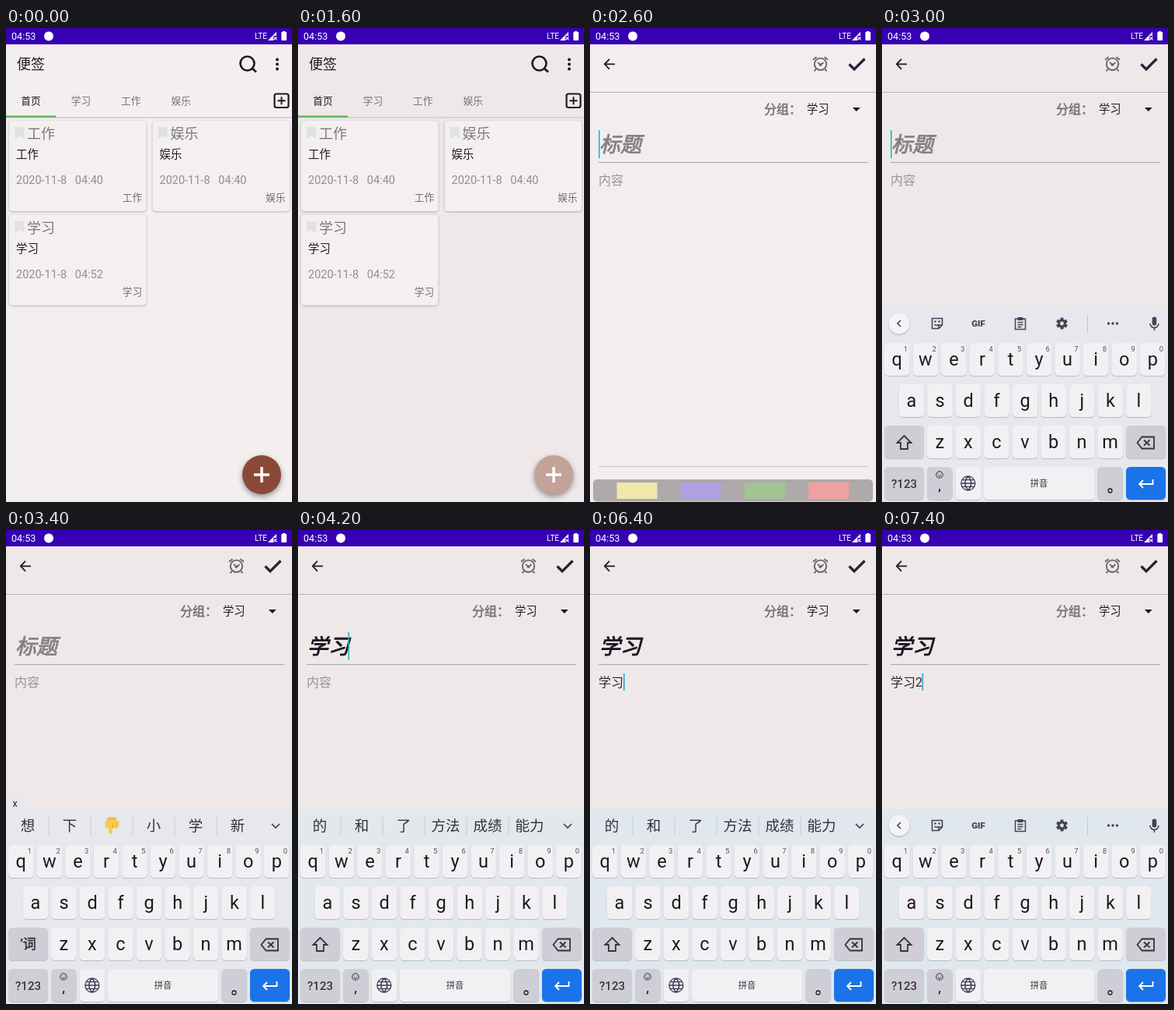
An HTML page with a canvas that plays this animation: 368x608 px, repeating every 8000 ms.

```html
<!DOCTYPE html>
<html lang="zh-CN">
<head>
<meta charset="utf-8">
<title>便签</title>
<style>
html, body { margin: 0; width: 100%; height: 100%; overflow: hidden; background: #efe8e8; }
canvas { display: block; width: 368px; height: 608px; }
</style>
</head>
<body>
<canvas id="stage" width="368" height="608"></canvas>
<script>
const ctx = document.getElementById('stage').getContext('2d');
const LOOP = 8000;
const FONT = 'Roboto, "Noto Sans CJK SC", "Noto Sans CJK", sans-serif';
const INK = '#1d1a1f';

function text(str, x, midY, size, color = INK, align = 'left', style = '') {
  ctx.font = `${style} ${size}px ${FONT}`;
  ctx.fillStyle = color;
  ctx.textAlign = align;
  ctx.fillText(str, x, midY + size * 0.37);
}

// Regular glyphs thickened by an outline, as Android does for CJK bold
function boldText(str, x, midY, size, color, align = 'left', style = '') {
  text(str, x, midY, size, color, align, style);
  ctx.lineWidth = size / 30;
  ctx.lineJoin = 'round';
  ctx.strokeStyle = color;
  ctx.strokeText(str, x, midY + size * 0.37);
  ctx.lineJoin = 'miter';
}

function rect(x, y, w, h, color) {
  ctx.fillStyle = color;
  ctx.fillRect(x, y, w, h);
}

function roundRect(x, y, w, h, r, color) {
  ctx.beginPath();
  ctx.roundRect(x, y, w, h, r);
  ctx.fillStyle = color;
  ctx.fill();
}

function disc(x, y, r, color) {
  ctx.beginPath();
  ctx.arc(x, y, r, 0, Math.PI * 2);
  ctx.fillStyle = color;
  ctx.fill();
}

function shadowed(blur, dy, color, draw) {
  ctx.save();
  ctx.shadowBlur = blur;
  ctx.shadowOffsetY = dy;
  ctx.shadowColor = color;
  draw();
  ctx.restore();
}

// SVG path strings, placed at an offset
function stroke(d, x, y, width, color = INK) {
  ctx.save();
  ctx.translate(x, y);
  ctx.lineWidth = width;
  ctx.strokeStyle = color;
  ctx.stroke(new Path2D(d));
  ctx.restore();
}

function fill(d, x, y, color = INK) {
  ctx.save();
  ctx.translate(x, y);
  ctx.fillStyle = color;
  ctx.fill(new Path2D(d), 'evenodd');
  ctx.restore();
}

const circle = r => `M${r} 0A${r} ${r} 0 1 1 ${-r} 0A${r} ${r} 0 1 1 ${r} 0Z`;

function statusBar() {
  rect(0, 0, 368, 21, '#3700b3');
  text('04:53', 7, 10.7, 12.6, '#fff');
  disc(55, 10.5, 6, '#fff');
  text('LTE', 320, 10.5, 10.3, '#fff');
  fill('M11 0V11H0Z', 337, 5, '#fff');
  rect(344, 10, 5, 6, '#3700b3');
  stroke('M0 0L4 4M4 0L0 4', 344.5, 11.3, 1.2, '#fff');
  rect(356, 4, 3, 2, '#fff');
  roundRect(354.3, 5, 6.8, 11, 1, '#fff');
}

function card(x, y, name, time) {
  shadowed(2.5, 0.8, 'rgba(60,60,70,.4)', () => roundRect(x, y, 176.5, 116, 4, '#f3f0ef'));
  fill('M0 0H12V15L6 11.5L0 15Z', x + 7.3, y + 8, '#e1e1e3');
  text(name, x + 23, y + 16.5, 18, '#7b7879');
  text(name, x + 9, y + 43, 14.4);
  text('2020-11-8   ' + time, x + 9, y + 76, 14.5, '#918e8f');
  text(name, x + 171, y + 98.5, 12.6, '#6f6c6d', 'right');
}

function homeScreen(pressed) {
  text('便签', 14, 46.5, 18);
  stroke(circle(9), 310.5, 45.5, 2.6);
  stroke('M0 0L5.5 5', 316.5, 51.5, 2.8);
  for (const y of [40.5, 46.5, 52.5]) disc(349, y, 2, INK);

  ['首页', '学习', '工作', '娱乐'].forEach((name, i) =>
    text(name, 32 + i * 64.4, 93, 12.7, i ? '#777375' : INK, 'center'));
  ctx.beginPath();
  ctx.roundRect(345.5, 84.5, 18, 17.5, 2.5);
  ctx.lineWidth = 2.2;
  ctx.strokeStyle = INK;
  ctx.stroke();
  stroke('M-5 0H5M0 -5V5', 354.5, 93.2, 2);
  rect(0, 114, 368, 1, '#cfcccd');
  rect(0, 115, 368, 1, '#dedadb');
  rect(0, 112.5, 64, 2, '#4caf50');

  card(4, 119, '工作', '04:40');
  card(188.5, 119, '娱乐', '04:40');
  card(4, 239.7, '学习', '04:52');

  shadowed(7, 3, 'rgba(0,0,0,.4)', () => disc(329, 573, 25, pressed ? '#c3a298' : '#8a4938'));
  stroke('M-10 0H10M0 -10V10', 329, 573, 3.4, '#fff');
}

function editor({ title = '', body = '', cursor }) {
  stroke('M14 0H1M7 -6.5L0.8 0L7 6.5', 18, 46.3, 1.8);
  const gray = '#68656a';
  stroke(circle(7.7), 296.5, 46.3, 1.9, gray);
  stroke('M-9.5 -5.5L-5 -9M9.5 -5.5L5 -9M-6 6.5L-8 9M6 6.5L8 9M-3.5 -2.5L0 1L4 -2', 296.5, 46.3, 1.9, gray);
  disc(296.5, 47.3, 1.8, gray);
  stroke('M0 0L6.5 6.5L20 -7', 333.5, 46.5, 3.2, '#2a2135');
  rect(0, 82, 368, 1, '#b9b4b6');

  boldText('分组：', 224, 104, 16, '#747277');
  text('学习', 279, 104, 14.3);
  fill('M0 0H10L5 5Z', 337.8, 102, INK);

  boldText(title || '标题', 12, 149, 27, title ? '#1b1722' : '#858083', 'left', 'italic');
  rect(11, 172, 347, 1, '#aaa6a8');
  text(body || '内容', 11, 195, 16, body ? '#2b272c' : '#989496');
  if (cursor === 'title') rect(title ? 64.5 : 11, 131, 1.6, 36, '#1fb9c4');
  if (cursor === 'body') rect(body ? (body.length > 2 ? 51.5 : 43) : 11, 184, 1.6, 22, '#2aa5d0');

  rect(11, 562, 347, 1, '#ccc5bd');
  roundRect(4, 579, 360, 28.5, 5, '#aeaaaa');
  ['#eee8ad', '#b0a0e0', '#a0c592', '#f0a0a1'].forEach((c, i) => rect(34.5 + i * 82.2, 583, 52, 21, c));
}

const WORDS = {
  x: ['想', '下', 'hand', '小', '学', '新'],
  xx: ['谢谢', '学习', '信息', '学校', '消息', '相信'],
  next: ['的', '和', '了', '方法', '成绩', '能力']
};

function pointingHand(x, y) {
  roundRect(x - 6, y - 10.5, 12, 5, 2, '#f0be45');
  roundRect(x - 8.5, y - 7, 18, 11, 4.5, '#f7cb4d');
  roundRect(x - 4, y - 4, 5, 15, 2.5, '#f7cb4d');
  stroke('M0 -1V5M4 -1V4.5', x + 1.5, y - 2, 0.9, '#dfa62f');
}

function suggestions(words) {
  words.forEach((word, i) => {
    const x = 28 + i * 54;
    if (word === 'hand') pointingHand(x, 379);
    else text(word, x, 379, 18.5, '#35313c', 'center');
    if (i) rect(x - 27.5, 368, 1, 23, '#c5c7cc');
  });
  stroke('M-5 -2.5L0 2.5L5 -2.5', 347, 379.5, 1.7, '#47424f');
}

function toolbar(tray) {
  const tone = '#47424f';
  shadowed(2, 1, 'rgba(0,0,0,.25)', () => disc(22, 379, 13.5, '#f6f3f6'));
  stroke('M2 -4L-2 0L2 4', 22, 379, 1.6, tone);
  stroke('M-6.5 -6.5H6.5V2L2 6.5H-6.5ZM6.5 2H2V6.5M-3.5 1Q-1 4 1.5 1', 71, 379, 1.6, tone);
  disc(68.5, 376.5, 1.2, tone);
  disc(73.5, 376.5, 1.2, tone);
  text('GIF', 124, 379, 11.5, tone, 'center', '900');
  stroke('M-6.5 -6H6.5V7.5H-6.5ZM-3.5 -1.5H3.5M-3.5 1.5H3.5M-3.5 4.5H1.5', 178, 379, 1.5, tone);
  rect(174.5, 371, 7, 4, tone);
  for (let i = 0; i < 6; i++) {
    const a = i * Math.PI / 3 + Math.PI / 6;
    stroke(`M0 0L${Math.cos(a) * 7.4} ${Math.sin(a) * 7.4}`, 231.5, 379, 4, tone);
  }
  stroke(circle(4), 231.5, 379, 3, tone);
  disc(231.5, 379, 2.4, tray);
  rect(264, 368, 1, 23, '#c5c7cc');
  for (const x of [291.5, 297, 302.5]) disc(x, 379, 1.7, tone);
  roundRect(347.6, 370.5, 5.6, 11, 2.8, tone);
  stroke('M-5.5 0A5.5 5.5 0 0 0 5.5 0M0 5.5V9', 350.4, 379, 1.6, tone);
}

function key(x, y, w, color = '#f3f0f4') {
  shadowed(1, 1, 'rgba(70,75,90,.28)', () => roundRect(x, y, w, 42, 5.5, color));
}

function letterRow(letters, x, y, numbered) {
  [...letters].forEach((ch, i) => {
    const left = x + i * 36.55;
    key(left, y, 32.6);
    text(ch, left + 16.3, y + 20, 23.5, INK, 'center');
    if (numbered) text(String((i + 1) % 10), left + 27.5, y + 7.7, 9.5, '#55515a', 'center');
  });
}

function keyboard({ typed = '', bar, tray, accent }) {
  const special = '#cfced6';
  const tone = '#37333b';
  rect(0, 358, 368, 250, tray);
  if (typed) {
    rect(0, 343, typed.length > 1 ? 32 : 24, 15, tray);
    [...typed].forEach((ch, i) => text(ch, 8.5 + i * 11, 350.5, 12.5));
  }
  if (bar) suggestions(WORDS[bar]);
  else toolbar(tray);

  letterRow('qwertyuiop', 3, 404, true);
  letterRow('asdfghjkl', 21.7, 457);
  letterRow('zxcvbnm', 58, 510);

  key(3, 510, 51, special);
  if (typed) boldText('‘词', 28.5, 531, 17, tone, 'center');
  else stroke('M0 -9L9 0H4.5V8H-4.5V0H-9Z', 28.5, 532, 1.8, tone);
  key(314, 510, 51, special);
  stroke('M-11 0L-5 -7.5H10.5V7.5H-5ZM-2.5 -3.5L5 3.5M5 -3.5L-2.5 3.5', 339.5, 532, 1.8, tone);

  key(3, 563, 51, special);
  text('?123', 28.5, 584.5, 15, tone, 'center', '500');
  key(58, 563, 32.6, special);
  stroke(circle(4.3), 74, 573, 1, tone);
  stroke('M-2.2 1Q0 3.4 2.2 1M-1.8 -1.6V-0.6M1.8 -1.6V-0.6', 74, 573, 1, tone);
  text(',', 74, 586, 19, INK, 'center');
  key(94.6, 563, 32.6);
  stroke(circle(9) + 'M-9 0H9M-7.8 -4.3H7.8M-7.8 4.3H7.8M0 -9Q-8 0 0 9Q8 0 0 -9', 110.8, 584, 1.3, '#3f3a55');
  key(131, 563, 142.5);
  text('拼音', 202, 584, 11.3, tone, 'center');
  key(277.5, 563, 32.6, special);
  stroke(circle(2.5), 293.5, 593.5, 1.3);
  key(314, 563, 51, accent);
  stroke('M9 -5V1H-8M-3.5 -4L-8.3 1L-3.5 6', 339.5, 584, 1.9, '#fff');
}

// Each step adds to the state before it.
const STEPS = [
  [0, { bg: '#f2efee', tray: '#e6e8ed', accent: '#1a73e8' }],
  [400, { bg: '#f0ebeb' }],
  [1600, { bg: '#efe8e8', pressed: true }],
  [1800, { editing: true, enter: 0.7 }],
  [2000, { enter: 1, bg: '#f2eef0' }],
  [2200, { cursor: 'title' }],
  [2800, { keys: 0.6 }],
  [3000, { keys: 1, bg: '#efe8e8' }],
  [3400, { typed: 'x', bar: 'x', cursor: '' }],
  [3600, { typed: 'xx', bar: 'xx' }],
  [3800, { cursor: 'title' }],
  [4200, { typed: '', bar: 'next', title: '学习', tray: '#e2e8eb' }],
  [4600, { cursor: '' }],
  [4800, { cursor: 'body', bar: '' }],
  [5200, { typed: 'x', bar: 'x' }],
  [5400, { typed: 'xx', bar: 'xx', cursor: '', tray: '#e0e8ee', accent: '#4049cf' }],
  [5800, { typed: '', bar: 'next', body: '学习', cursor: 'body', accent: '#1a73e8' }],
  [6200, { cursor: '' }],
  [6400, { cursor: 'body' }],
  [6600, { body: '学习2', bar: '' }],
  [7000, { cursor: '' }],
  [7400, { cursor: 'body' }]
];

function draw(now) {
  const time = now % LOOP;
  const state = {};
  for (const [at, change] of STEPS) if (time >= at) Object.assign(state, change);

  rect(0, 0, 368, 608, state.bg);
  if (!state.editing || state.enter < 1) homeScreen(state.pressed);
  if (state.editing) {
    ctx.save();
    ctx.globalAlpha = state.enter;
    ctx.translate(0, (1 - state.enter) * 40);
    rect(0, 21, 368, 587, state.bg);
    editor(state);
    ctx.restore();
  }
  if (state.keys) {
    ctx.save();
    ctx.translate(0, (1 - state.keys) * 250);
    keyboard(state);
    ctx.restore();
  }
  statusBar();
  requestAnimationFrame(draw);
}
requestAnimationFrame(draw);
</script>
</body>
</html>
```
